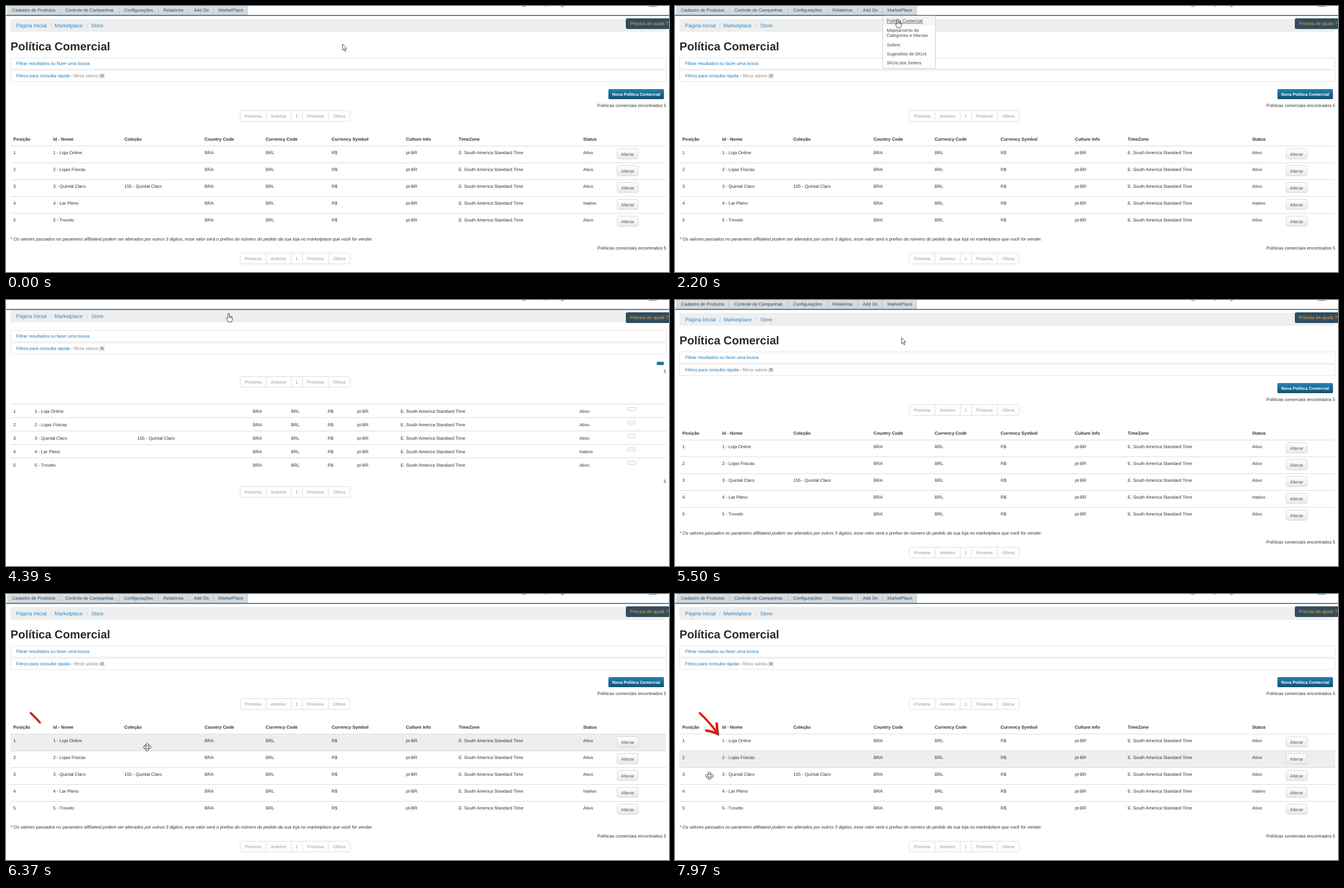
Animation, 1182 px wide and 474 px high, one loop 8 s. Source, as an HTML page:

```html
<!DOCTYPE html>
<html lang="pt-BR">
<head>
<meta charset="utf-8">
<title>Política Comercial</title>
<style>
html, body { margin: 0; width: 100%; height: 100%; overflow: hidden; background: #fff; }
svg { display: block; width: 100%; height: 100%; }
text { font: 7.95px "Liberation Sans", Arial, sans-serif; fill: #333; text-rendering: geometricPrecision; white-space: pre; }
.b { font-weight: bold; }
.link { fill: #1a78bd; }
.crumb { font-size: 9.2px; fill: #2f87c9; }
.sep { font-size: 9.2px; fill: #bbb; }
.gray { fill: #999; }
.tab { fill: #33485a; }
.end { text-anchor: end; }
.mid { text-anchor: middle; }
#cursor path { fill: #fff; stroke: #2a2a2a; stroke-width: .85; stroke-linejoin: round; }
#sketch, #shade { fill: none; stroke-linecap: round; }
#sketch { stroke: #e8140c; stroke-width: 3.5; }
#shade { stroke: #4a0d0d; stroke-width: 3.5; opacity: .6; }
</style>
</head>
<body>
<svg id="stage" viewBox="0 0 1182 474" xmlns="http://www.w3.org/2000/svg"></svg>
<script>
const LOOP = 8000;
const LOADING = 3860, HEADER_IN = 4390, LOADED = 5020;

const text = (x, y, s, cls = '', style = '') =>
  `<text x="${x}" y="${y}" class="${cls}" style="${style}">${s}</text>`;
const box = (x, y, w, h, fill, stroke = 'none', r = 0) =>
  `<rect x="${x}" y="${y}" width="${w}" height="${h}" fill="${fill}" stroke="${stroke}" rx="${r}"/>`;
const line = (x1, y1, x2, y2, color) =>
  `<path d="M${x1} ${y1}L${x2} ${y2}" stroke="${color}"/>`;
const group = (id, body, attrs = '') => `<g id="${id}" ${attrs}>${body}</g>`;

const rows = [
  ['1 - Loja Online', '', 'Ativo'],
  ['2 - Lojas Físicas', '', 'Ativo'],
  ['3 - Quintal Claro', '155 - Quintal Claro', 'Ativo'],
  ['4 - Lar Pleno', '', 'Inativo'],
  ['5 - Trovelo', '', 'Ativo']
];

function table(cols, top, step, baseline, button) {
  return rows.map(([name, coll, status], i) => {
    const y = top + i * step;
    const cells = [i + 1, name, coll, 'BRA', 'BRL', 'R$', 'pt-BR', 'E. South America Standard Time', status];
    return line(8, y, 1177, y, '#d9dcde') +
      cells.map((c, k) => text(cols[k], y + baseline, c)).join('') + button(y);
  }).join('');
}

function pager(y) {
  const edges = [417.5, 463.5, 508.5, 528.5, 574.5, 613.5];
  return box(417.5, y, 196, 19, '#fff', '#ddd', 2) +
    edges.slice(1, 5).map(x => line(x, y, x, y + 19, '#ddd')).join('') +
    ['Primeira', 'Anterior', '1', 'Próxima', 'Última'].map((s, i) =>
      text((edges[i] + edges[i + 1]) / 2, y + 12.5, s, 'gray mid')).join('');
}

const crumbs = y =>
  box(8, y, 1169, 23, '#eee', 'none', 3) +
  [[18, 'Página Inicial'], [86.5, 'Marketplace'], [152, 'Store']]
    .map(([x, s]) => text(x, y + 14.8, s, 'crumb')).join('') +
  [79, 143].map(x => text(x, y + 14.8, '/', 'sep')).join('');

const filters = y =>
  box(8.5, y, 1168.5, 20, '#fff', '#e4e4e4', 2) +
  box(8.5, y + 22, 1168.5, 20, '#fff', '#e4e4e4', 2) +
  text(18, y + 12.5, 'Filtrar resultados ou fazer uma busca', 'link') +
  text(18, y + 34.8, 'Filtros para consulta rápida<tspan fill="#333"> - </tspan>' +
    '<tspan fill="#888">filtros salvos [</tspan><tspan class="b" fill="#555">0</tspan><tspan fill="#888">]</tspan>', 'link');

function tabs() {
  const edges = [2, 97, 202, 272, 326, 370, 431];
  const names = ['Cadastro de Produtos', 'Controle de Campanhas', 'Configurações', 'Relatórios', 'Add On', 'MarketPlace'];
  return names.map((s, i) =>
    box(edges[i], -4, edges[i + 1] - edges[i], 20, 'url(#tabFill)') +
    line(edges[i + 1] - .5, 0, edges[i + 1] - .5, 16, '#bcc5ca') +
    text(edges[i] + 8.8, 9.5, s, 'tab')).join('');
}

function fullPage() {
  const cols = [13, 84, 211, 354, 463, 580.5, 713, 807, 1029];
  const heads = ['Posição', 'Id - Nome', 'Coleção', 'Country Code', 'Currency Code', 'Currency Symbol', 'Culture Info', 'TimeZone', 'Status'];
  const change = y => box(1089.5, y + 5, 37.5, 18, 'url(#btnFill)', '#d6d6d6', 3) +
    text(1108.3, y + 17, 'Alterar', 'mid', 'fill:#3f5f80');
  const found = y => text(1177, y, 'Políticas comerciais encontrados 5', 'end');
  return tabs() + crumbs(23) +
    text(8, 79.3, 'Política Comercial', 'b', 'font-size:20.5px;fill:#2a2a2a') +
    filters(92.5) +
    box(1074, 148, 99, 18, 'url(#blueFill)', 'none', 2) +
    text(1123.5, 159.6, 'Nova Política Comercial', 'b mid', 'font-size:7.5px;fill:#fff') +
    found(180.3) + pager(186.5) +
    heads.map((s, i) => text(cols[i], 239.8, s, 'b')).join('') +
    group('hover', box(8, 0, 1169, 29, '#eee')) +
    table(cols, 249.5, 30, 14.2, change) +
    text(8, 418.4, '* Os valores passados no parametro affiliateid podem ser alterados por outros 3 digitos, esse valor será o prefixo do número do pedido da sua loja no marketplace que você for vender.', '', 'font-style:italic') +
    found(434.3) + pager(440.5);
}

function barePage() {
  const cols = [13, 51, 234, 440, 508, 573.5, 626, 703.5, 1022.5];
  return crumbs(-9) + filters(28.5) +
    box(1160, 84, 13, 6, '#1c7aa9', 'none', 2) +
    text(1177, 104.3, '5', 'end') + pager(110.5) +
    table(cols, 159.5, 24, 15.2, y => box(1108.5, y + 6, 14, 5.5, '#fff', '#ccc', 2.5)) +
    text(1177, 300.3, '5', 'end') + pager(306.5);
}

function menu() {
  const items = [[29.4, 'Política Comercial'], [45.5, 'Mapeamento de'], [55.2, 'Categorias e Marcas'],
    [71.6, 'Sellers'], [87.8, 'Sugestões de SKUs'], [104, 'SKUs dos Sellers']];
  return box(370.5, 17.5, 94, 94, '#fff', '#ccd0d3', 1) +
    group('itemBg', box(371, 18, 93, 17, '#f4f4f4')) +
    items.map(([y, s]) => text(377.5, y, s, 'tab')).join('') +
    group('underline', box(377.5, 30.4, 64.5, .8, '#33485a'));
}

const header =
  box(0, 16, 1182, 1.5, '#2a557e') +
  [[921, 'jy'], [961, 'p'], [989, 'g']].map(([x, s]) => text(x, -1.2, s, '', 'font-size:11.5px')).join('') +
  box(1146, -1, 14, 1.8, '#2d5b83');

const help = box(1105.5, 22.5, 80, 18, '#304d5f', '#304d5f', 2) +
  text(1112.5, 34, 'Precisa de ajuda ?', '', 'font-size:8.25px;fill:#f2a43a');

const gradient = (id, a, b) =>
  `<linearGradient id="${id}" x2="0" y2="1"><stop stop-color="${a}"/><stop offset="1" stop-color="${b}"/></linearGradient>`;

const strokes = ['M44 212Q62 229 75.5 248', 'M55 243Q66 244 76 249', 'M74 230Q74 240 76 249']
  .map(d => `<path d="${d}" pathLength="1"/>`).join('');

const shapes = {
  arrow: 'M0 0V10.8L2.5 8.5 4.2 12.6 6 11.8 4.3 7.8H7.6Z',
  hand: 'M-1.3 7.5V.8Q-1.2-.6 0-.6T1.3.8V5Q2.6 4.3 3.3 5.4 4.6 4.9 5 6 6.4 5.8 6.5 7.2V10.5Q6.4 12.5 5.3 13.6V15H-1.2V13.6L-4.2 9.5Q-4.9 8 -3.7 7.6 -2.6 7.4-1.3 9ZM1.3 5V8M3.3 5.4V8M5 6V8.3',
  move: 'M0-7.5L3.2-4.3H1.3V-1.3H4.3V-3.2L7.5 0 4.3 3.2V1.3H1.3V4.3H3.2L0 7.5-3.2 4.3H-1.3V1.3H-4.3V3.2L-7.5 0-4.3-3.2V-1.3H-1.3V-4.3H-3.2Z'
};

document.getElementById('stage').innerHTML =
  `<defs>${gradient('tabFill', '#dde2e4', '#ced5d9')}${gradient('btnFill', '#fff', '#e9e9e9')}${gradient('blueFill', '#2184b4', '#14506f')}</defs>` +
  group('full', fullPage()) + group('bare', barePage()) + group('header', header) +
  group('menu', menu()) + group('help', help) +
  group('shade', strokes, 'transform="translate(1.4 1.6)"') + group('sketch', strokes) +
  group('cursor', '<path id="shape"/>');

const $ = id => document.getElementById(id);
const show = (id, on) => { $(id).style.display = on ? '' : 'none'; };
const clamp = v => Math.max(0, Math.min(1, v));

// time, x, y of the pointer's hot spot
const track = [
  [0, 600, 68], [530, 600, 68], [680, 575, 77], [840, 523, 82], [980, 466, 79], [1090, 432, 71],
  [1330, 400, 49], [1360, 400, 45], [1500, 398, 14], [1630, 399, 5], [1930, 399, 5], [2200, 397, 24],
  [LOADED, 397, 24], [5200, 398, 36], [5500, 404, 67], [5830, 385, 122], [6150, 310, 240],
  [6370, 252, 273], [6610, 178, 259], [7030, 70, 257], [7190, 70, 257], [7850, 62, 303],
  [7970, 61.5, 324], [LOOP, 61.5, 324]
];

function pointer(t) {
  const i = track.findIndex(k => k[0] > t);
  const [t0, x0, y0] = track[i - 1], [t1, x1, y1] = track[i];
  const p = (t - t0) / (t1 - t0);
  return [x0 + (x1 - x0) * p, y0 + (y1 - y0) * p];
}

function drawSketch(t) {
  const drawn = (t - 6173) / 857;
  const spans = [[0, .5], [.5, .76], [.76, 1]];
  for (const id of ['shade', 'sketch']) {
    [...$(id).children].forEach((path, i) => {
      const [a, b] = spans[i], p = clamp((drawn - a) / (b - a));
      path.style.display = p > 0 ? '' : 'none';
      path.setAttribute('stroke-dasharray', `${p} 2`);
    });
  }
}

function render(t) {
  const loaded = t < LOADING || t >= LOADED;
  show('full', loaded);
  show('bare', !loaded);
  show('header', loaded || t >= HEADER_IN);
  $('bare').setAttribute('transform', `translate(0 ${t >= HEADER_IN ? 26 : 0})`);

  const [x, y] = pointer(t);
  const onItem = t > 1930 && y > 17;
  show('menu', t >= 1500 && t < LOADING);
  show('itemBg', onItem);
  show('underline', onItem);

  // row highlight trails the pointer slightly
  const row = Math.floor((pointer(Math.max(0, t - 120))[1] - 249) / 30);
  show('hover', row >= 0);
  $('hover').setAttribute('transform', `translate(0 ${250 + row * 30})`);

  const kind = t >= 1500 && t < LOADED ? 'hand' : y > 249 ? 'move' : 'arrow';
  $('shape').setAttribute('d', shapes[kind]);
  $('cursor').setAttribute('transform', `translate(${x.toFixed(2)} ${y.toFixed(2)})`);
  drawSketch(t);
}

function tick() {
  render(performance.now() % LOOP);
  requestAnimationFrame(tick);
}
tick();
</script>
</body>
</html>
```
